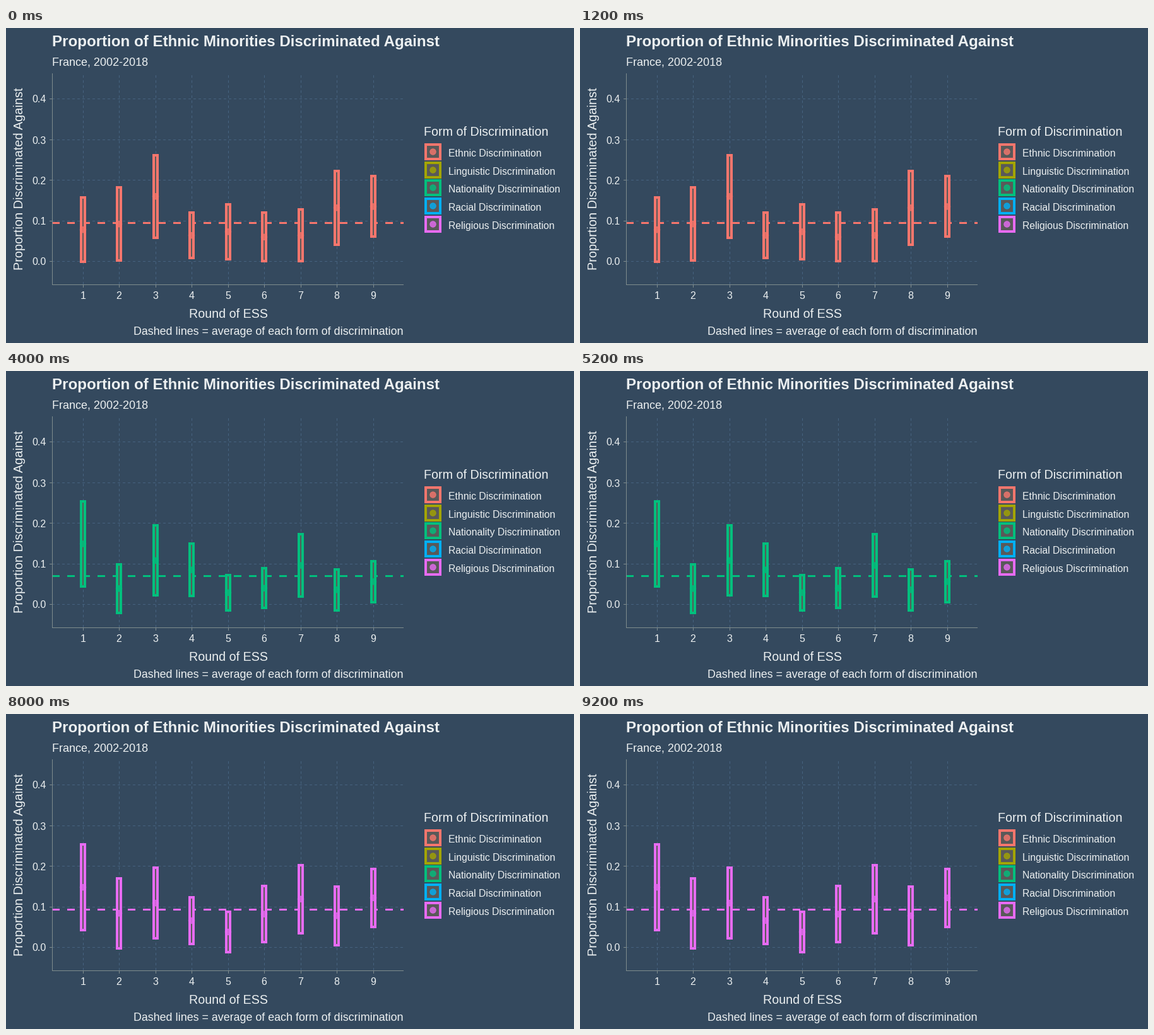
Write a matplotlib script that moves like this. It is 900 px wide and 500 px high and loops after 10000 ms.

```python
import matplotlib.pyplot as plt
import numpy as np
from matplotlib.animation import FuncAnimation
from matplotlib.patches import Circle, Rectangle

DPI = 100
PX = 72 / DPI  # points per pixel
BG, INK, GRID, AXIS, FILL = "#34495e", "#ecf0f1", "#46627f", "#7f8c8d", "#595959"
LEFT, RIGHT, TOP, BOTTOM = 73, 630, 72, 407
DASH = (0, (4, 4))

plt.rcParams["font.family"] = "Liberation Sans"

# percent discriminated against in rounds 1-9
FORMS = {
    "Ethnic": ("#f8766d", "7.8 9.2 16 6.4 7.3 6 6.4 13.2 13.5"),
    "Linguistic": ("#a3a500", "8.8 0 4.8 1.3 2.7 2.5 1.4 2.9 3.3"),
    "Nationality": ("#00bf7d", "14.9 3.9 10.8 8.5 2.9 4 9.6 3.6 5.6"),
    "Racial": ("#00b0f6", "24 14.3 31.7 13.9 21.2 12.6 24.8 16 23.2"),
    "Religious": ("#e76bf3", "14.8 8.4 10.9 6.6 3.8 8.2 11.9 7.8 12.2"),
}
SAMPLE = np.array([44, 40, 50, 73, 57, 61, 57, 53, 81])  # respondents per round

fig = plt.figure(figsize=(9, 5), dpi=DPI, facecolor=BG)
ax = fig.add_axes([0, 0, 1, 1])
ax.set(xlim=(0, 900), ylim=(500, 0))
ax.axis("off")


def line(x0, y0, x1, y1, color, width=1, style="-", z=1):
    return ax.plot([x0, x1], [y0, y1], color=color, lw=width * PX, ls=style,
                   solid_capstyle="butt", dash_capstyle="butt", snap=False,
                   zorder=z)[0]


def label(x, y, text, size, **kw):
    ax.text(x, y, text, fontsize=size * PX, color=INK, va="baseline", **kw)


def box(x0, y0, x1, y1, color):
    return ax.add_patch(Rectangle((x0, y0), x1 - x0, y1 - y0, fc=FILL, ec=color,
                                  lw=4 * PX, joinstyle="miter", zorder=4))


def dot(x, y, color):
    return ax.add_patch(Circle((x, y), 4.7, fc=color, ec=color, lw=PX,
                               alpha=0.8, zorder=5))


def round_x(i):
    return round(121.9 + 57.45 * i)


def value_y(p):
    return 370.5 - 645 * p


def draw_panel():
    for i in range(5):
        y = int(value_y(i / 10)) + 0.5
        line(LEFT, y, RIGHT, y, GRID, style=DASH)
        line(LEFT - 4, y, LEFT, y, AXIS)
        label(64, y + 6, f"{i / 10:.1f}", 16, ha="right")
    for i in range(9):
        x = round_x(i)
        line(x + 0.5, BOTTOM, x + 0.5, TOP, GRID, style=DASH)
        line(x + 0.5, BOTTOM, x + 0.5, BOTTOM + 5, AXIS)
        label(x, 430, str(i + 1), 16, ha="center")
    line(LEFT + 0.5, TOP, LEFT + 0.5, BOTTOM + 1, AXIS, z=6)
    line(LEFT, BOTTOM + 0.5, RIGHT, BOTTOM + 0.5, AXIS, z=6)


def draw_text():
    label(LEFT, 29, "Proportion of Ethnic Minorities Discriminated Against", 24.1,
          weight="bold")
    label(LEFT, 60, "France, 2002-2018", 18)
    label(352, 460, "Round of ESS", 19.7, ha="center")
    label(27, 384.5, "Proportion Discriminated Against", 19.9, rotation=90,
          rotation_mode="anchor")
    label(RIGHT, 487, "Dashed lines = average of each form of discrimination", 17.87,
          ha="right")


def draw_legend():
    label(661.5, 171, "Form of Discrimination", 19.65)
    for i, (name, (color, _)) in enumerate(FORMS.items()):
        y = int(196.4 + 28.7 * i)
        box(665, y - 11, 688, y + 12, color)
        dot(676.5, y + 0.5, color)
        label(701, y + 8, f"{name} Discrimination", 15.7)


def build_form(color, percents):
    """Average line plus a 95% interval and a point for each round."""
    p = np.array(percents.split(), float) / 100
    margin = 1.96 * np.sqrt(p * (1 - p) / SAMPLE)
    mean = round(value_y(p.mean())) + 0.5
    parts = [line(LEFT, mean, RIGHT, mean, color, 3, DASH, z=3)]
    for i, (mid, m) in enumerate(zip(p, margin)):
        x = round_x(i)
        if m > 0:
            parts.append(box(x - 3, value_y(mid + m), x + 3, value_y(mid - m), color))
        parts.append(dot(x, value_y(mid), color))
    return parts


draw_panel()
draw_text()
draw_legend()
layers = [build_form(*form) for form in FORMS.values()]


def update(n):
    for i, parts in enumerate(layers):
        for part in parts:
            part.set_visible(i == n)
    return sum(layers, [])


anim = FuncAnimation(fig, update, frames=len(FORMS), interval=2000,
                     repeat=True, repeat_delay=0)
plt.show()
```
